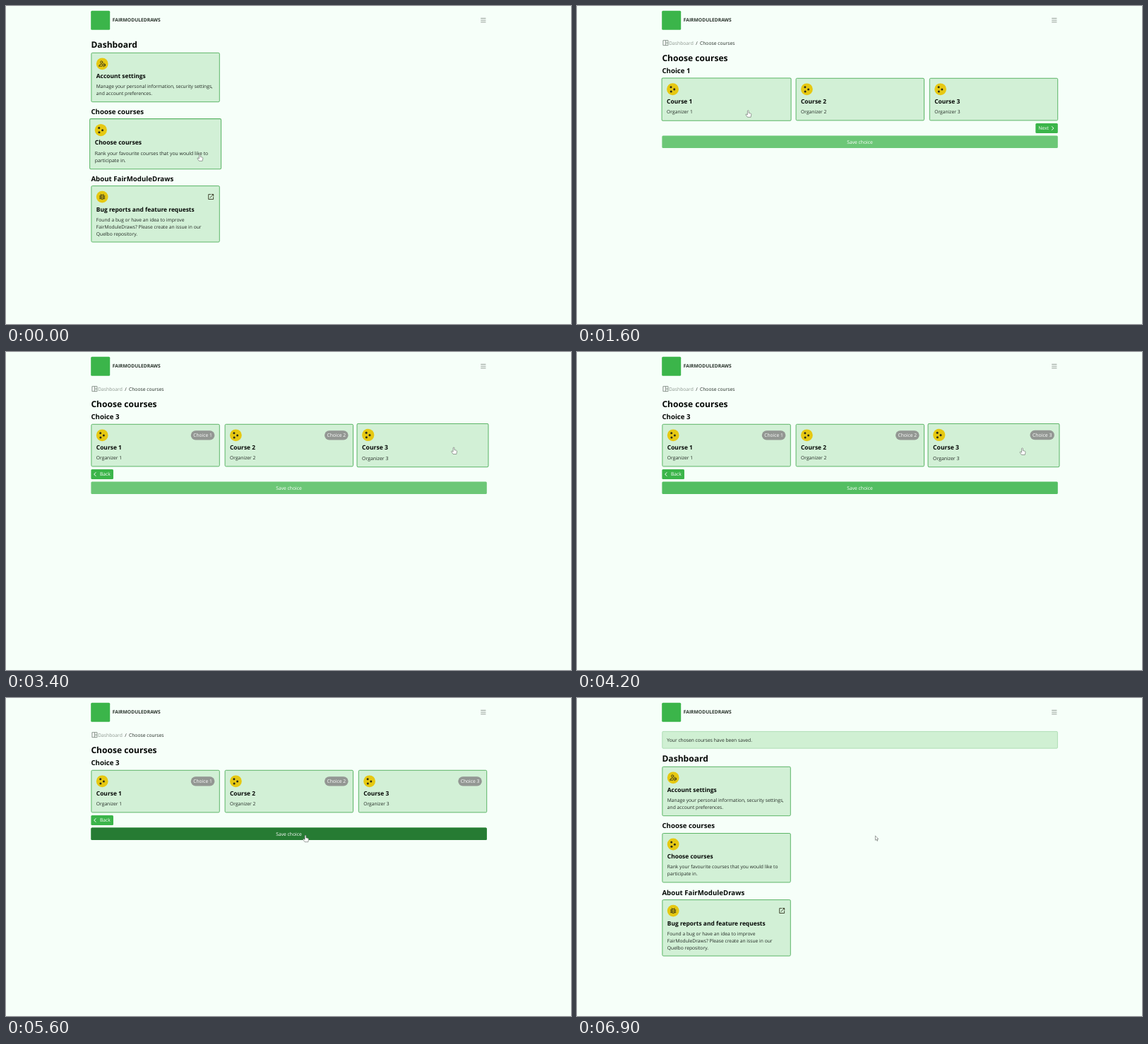
An HTML page for the animation above (7 s loop, 800x450 px).

```html
<!DOCTYPE html>
<html lang="en">
<head>
<meta charset="utf-8">
<title>Course choice</title>
<style>
  html, body { margin: 0; width: 100%; height: 100%; overflow: hidden; background: #f6fff9; }
  svg { display: block; width: 100%; height: 100%; }
  text { font: 6.72px "Open Sans", "Noto Sans", sans-serif; fill: #232b25; text-rendering: geometricPrecision; white-space: pre; }
  .h1, .h2, .h3, .brand { font-weight: 700; fill: #050806; }
  .h1 { font-size: 12.1px; }
  .h2 { font-size: 9.68px; }
  .h3 { font-size: 8.42px; }
  .brand { font-size: 6.72px; fill: #2a332c; }
  .muted { fill: #8d968f; }
  .light { fill: #fff; }
  .mid { text-anchor: middle; }
  .card { fill: #d2f0d6; stroke: #5cb567; stroke-width: 1; }
  .green { fill: #3bb54a; }
  .line { fill: none; stroke: #2c2c18; stroke-width: .85; stroke-linecap: round; stroke-linejoin: round; }
  .pointer { fill: #fff; stroke: #5b625d; stroke-width: .6; stroke-linejoin: round; }
</style>
</head>
<body>
<svg id="stage" viewBox="0 0 800 450"></svg>
<script>
const LOOP = 7000, STEP = 100;
const LEFT = 120.4, CARD_W = 182.4, COL = 189.2, WIDE = 560.4;

const text = (x, y, s, cls = "") => `<text x="${x}" y="${y}" class="${cls}">${s}</text>`;
const rect = (x, y, w, h, cls, r = 1.5, extra = "") =>
  `<rect x="${x}" y="${y}" width="${w}" height="${h}" rx="${r}" class="${cls}" ${extra}/>`;
const line = (d, extra = "") => `<path class="line" d="${d}" ${extra}/>`;
const group = (id, body, extra = "") => `<g id="${id}" ${extra}>${body}</g>`;

const icons = {
  user: line("M-4.3 3.3V2.4Q-4.1.8-1 .6M-4.3 3.3H-.4") +
    `<circle class="line" cx="-1" cy="-2.3" r="1.6"/><circle class="line" cx="2.4" cy="1.7" r="1.5"/>` +
    line("M2.4-.7V-.3M2.4 3.7V4.1M.3.5L.7.8M4.1 2.6L4.5 2.9M.3 2.9L.7 2.6M4.1.8L4.5.5"),
  dots: [[-2.5, -3], [2.2, .2], [-2.3, 3.2]]
    .map(([x, y]) => `<circle cx="${x}" cy="${y}" r="1.5" fill="#2c2c18"/>`).join(""),
  bug: line("M-2.1-.9Q-2-2.8 0-2.8T2.1-.9V1.4Q2 3.6 0 3.6T-2.1 1.4ZM-1.3-2.4L-2-3.7M1.3-2.4L2-3.7") +
    line("M-3.7-1.3H-2.1M-3.7.6H-2.1M-3.7 2.5H-2M3.7-1.3H2.1M3.7.6H2.1M3.7 2.5H2M-.7-.4H.7M-.7 1.5H.7")
};

const badgeIcon = (x, y, name) =>
  `<g transform="translate(${x} ${y})"><circle r="8.4" fill="#e6c812"/>${icons[name]}</g>`;

// x, y, h describe the outer edge; the border lies inside it
function card(id, x, y, h, icon, title, lines, more = "") {
  const body = rect(x + .5, y + .5, CARD_W - 1, h - 1, "card") + badgeIcon(x + 15.8, y + 16, icon) +
    text(x + 7.4, y + 36.4, title, "h3 late") +
    lines.map((s, i) => text(x + 7.4, y + 50.4 + i * 10, s)).join("") + more;
  return group(id, body);
}

const openIcon = (x, y) =>
  line(`M${x - .6} ${y - 3.4}H${x - 3.5}V${y + 3.5}H${x + 3.4}V${y + .6}M${x + 1} ${y - 3.5}H${x + 3.5}V${y - 1}M${x + 3.4} ${y - 3.4}L${x - 1.3} ${y + 1.3}`);

const header = rect(120.2, 6.8, 27, 27, "green") +
  text(150.7, 22.4, "FAIRMODULEDRAWS", "brand late") +
  `<path d="M672.2 17.4H679.4M672.2 20.1H679.4M672.2 22.8H679.4" stroke="#8b928d" stroke-width=".9"/>`;

const dash = text(LEFT, 59.2, "Dashboard", "h1 late") +
  card("account", LEFT, 65.8, 70.4, "user", "Account settings",
    ["Manage your personal information, security settings,", "and account preferences."]) +
  text(LEFT, 153.4, "Choose courses", "h2 late") +
  card("choose", LEFT, 160, 70.4, "dots", "Choose courses",
    ["Rank your favourite courses that you would like to", "participate in."]) +
  text(LEFT, 247.5, "About FairModuleDraws", "h2 late") +
  card("bugs", LEFT, 254.1, 80.4, "bug", "Bug reports and feature requests",
    ["Found a bug or have an idea to improve", "FairModuleDraws? Please create an issue in our", "Quelbo repository."],
    openIcon(290.2, 270));

const alertBox = rect(LEFT + .4, 47.4, WIDE - .8, 23.8, "", 1.2, 'fill="#d0f0d3" stroke="#a3d9aa" stroke-width=".8"') +
  text(127.3, 61.7, "Your chosen courses have been saved.");

function course(i) {
  const x = LEFT + i * COL, n = i + 1;
  const tag = group("tag" + i, rect(x + 141.4, 111.2, 33.6, 13.2, "", 6.6, 'fill="#939793"') +
    text(x + 158.2, 120.2, "Choice " + n, "light mid"));
  return card("course" + i, x, 101.8, 60.6, "dots", "Course " + n, ["Organizer " + n], tag);
}

const chevron = (x, dir) =>
  `<path d="M${x - 1.3 * dir} 170.3L${x + 1.3 * dir} 173L${x - 1.3 * dir} 175.7" fill="none" stroke="#fff" stroke-width="1"/>`;

const picker =
  `<path d="M121.9 48.7H129V55.7H121.9ZM125.6 48.7V55.7M125.6 52.2H129" fill="none" stroke="#727a74" stroke-width=".8"/>` +
  text(130.2, 54.6, "Dashboard", "muted") + text(168.3, 54.6, "/") + text(174, 54.6, "Choose courses") +
  text(LEFT, 78.4, "Choose courses", "h1 late") +
  `<text id="heading" x="${LEFT}" y="95.2" class="h2 late"></text>` +
  [0, 1, 2].map(course).join("") +
  group("back", rect(LEFT, 166, 31.6, 14, "green") + chevron(126, -1) + text(133, 175.4, "Back", "light")) +
  group("next", rect(649.3, 166, 31.5, 14, "green") + chevron(673.5, 1) + text(653.2, 175.4, "Next", "light")) +
  rect(LEFT, 183.4, WIDE, 17.6, "", 1.5, 'id="save"') +
  rect(LEFT, 183.4, WIDE, 17.6, "", 1.5, 'id="saveHover" fill="#267b33"') +
  text(400.5, 194.6, "Save choice", "light mid");

const hand = "M-.9.5Q0-.7.9.5V3.6L3.5 4.2Q4.6 4.6 4.5 5.7L3.8 9.5H-.9L-3.3 6.2Q-3.4 5-2.3 5.2L-.9 6.2Z";
const arrow = "M0 0V6.4L1.4 5.1L2.5 7.4L3.5 7L2.5 4.7H4.4Z";

const stage = document.getElementById("stage");
stage.innerHTML = header + group("alert", alertBox) + group("dash", dash) + group("picker", picker) +
  `<path id="pointer" class="pointer"/>`;

const $ = id => document.getElementById(id);
const late = [...document.querySelectorAll(".late")];
const show = (el, on) => el.setAttribute("visibility", on ? "inherit" : "hidden");

const OPEN = 1000, SAVED = 5700;
const PICKS = [2200, 2900, 3600];
const HOVERS = [[1540, 2430], [2430, 3080], [3130, 4430]];
const SAVE_HOVER = 4600;
const ARROWS = [[OPEN, 1540], [4430, SAVE_HOVER], [SAVED, LOOP]];
const PATH = [
  [0, 274.3, 209.8], [1050, 274.3, 209.8], [1580, 242.3, 147.8], [2300, 242.3, 147.8], [2560, 423, 148.3],
  [2950, 423, 148.3], [3280, 634, 135], [4150, 634, 135], [4800, 424, 194.2], [LOOP, 424, 194.2]
];

const clamp = v => Math.max(0, Math.min(1, v));
const ease = v => v * v * (3 - 2 * v);
const ramp = (t, from, ms = 150) => ease(clamp((t - from) / ms));
const within = (t, [a, b]) => t >= a && t < b;

function pointerAt(t) {
  const i = PATH.findIndex(([end]) => t < end);
  const [t0, x0, y0] = PATH[i - 1], [t1, x1, y1] = PATH[i];
  const k = ease((t - t0) / (t1 - t0));
  return [x0 + (x1 - x0) * k, y0 + (y1 - y0) * k];
}

function grow(id, cx, cy, level) {
  $(id).setAttribute("transform",
    `translate(${cx} ${cy}) scale(${1 + .025 * level}) translate(${-cx} ${-cy})`);
}

function draw(t) {
  const picking = within(t, [OPEN, SAVED]), saved = t >= SAVED;
  show($("dash"), !picking);
  show($("picker"), picking);
  show($("alert"), saved);
  $("dash").setAttribute("transform", `translate(0 ${saved ? 31 : 0})`);

  // Bold type appears one step after each page load
  const blank = [OPEN, SAVED].some(p => within(t, [p, p + STEP]));
  late.forEach(el => el.setAttribute("opacity", blank ? 0 : 1));

  grow("choose", LEFT + CARD_W / 2, 195.2, saved ? 0 : 1);
  const picks = PICKS.filter(p => t >= p).length;
  const step = Math.min(picks + 1, 3);
  $("heading").textContent = "Choice " + step;
  HOVERS.forEach(([a, b], i) => {
    grow("course" + i, LEFT + i * COL + CARD_W / 2, 132.1, ramp(t, a) - ramp(t, b));
    show($("tag" + i), picks > i);
  });
  show($("back"), step > 1);
  show($("next"), step < 3);
  $("save").setAttribute("fill", picks < 3 ? "#6cc777" : "#53be62");
  $("saveHover").setAttribute("opacity", ramp(t, SAVE_HOVER));

  const [x, y] = pointerAt(t), isArrow = ARROWS.some(a => within(t, a));
  $("pointer").setAttribute("d", isArrow ? arrow : hand);
  $("pointer").setAttribute("transform", `translate(${isArrow ? x - 1.6 : x} ${isArrow ? y + .7 : y})`);
}

const start = performance.now();
function tick() {
  const t = (performance.now() - start) % LOOP;
  draw(Math.floor(t / STEP) * STEP);
  requestAnimationFrame(tick);
}
tick();
</script>
</body>
</html>
```
